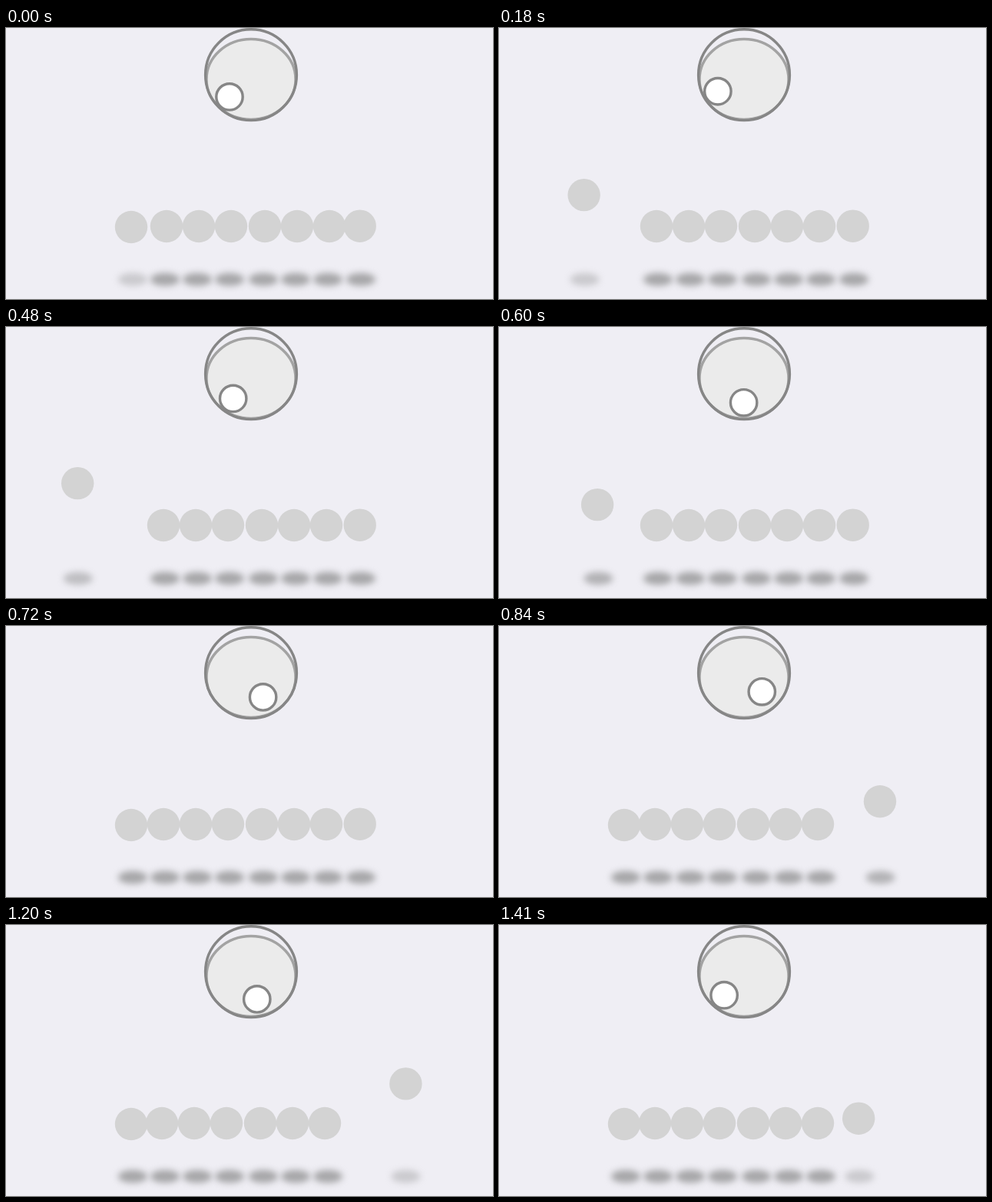
Write an HTML page that moves like this. It is 634 px wide and 354 px high and loops after 1440 ms.

```html
<!DOCTYPE html>
<html lang="en">
<head>
<meta charset="utf-8">
<title>Cradle</title>
<style>
  html, body { margin: 0; width: 100%; height: 100%; overflow: hidden; background: #efeef4; }
  svg { display: block; }
  #shadows ellipse { fill: #a6a6a8; filter: blur(4px); }
  #balls circle { fill: #d3d3d3; }
</style>
</head>
<body>
<svg width="634" height="354" viewBox="0 0 634 354">
  <ellipse cx="319" cy="67" rx="58" ry="52.5" fill="#ebebeb" stroke="#a3a3a3" stroke-width="3.4"/>
  <circle cx="319" cy="61.2" r="59.4" fill="none" stroke="#868686" stroke-width="3.4"/>
  <circle id="eye" r="17.2" fill="#fff" stroke="#868686" stroke-width="3.4"/>
  <g id="shadows"></g>
  <g id="balls"></g>
</svg>
<script>
const LOOP = 1440, STEP = 30;
const restX = [163, 205, 247, 289, 333, 375, 417, 460.7];
const shadowX = [165, 207, 249, 291, 335, 377, 419, 462];
const $ = id => document.getElementById(id);

function add(parent, tag, attrs) {
  const el = document.createElementNS('http://www.w3.org/2000/svg', tag);
  set(el, attrs);
  return parent.appendChild(el);
}
function set(el, attrs) {
  for (const key in attrs) el.setAttribute(key, attrs[key]);
}

const shadows = shadowX.map(cx => add($('shadows'), 'ellipse', { cx, cy: 328.5, rx: 19, ry: 8.5 }));
const balls = restX.map(cx => add($('balls'), 'circle', { cx, cy: 259, r: 21.2 }));

const clamp = x => Math.min(1, Math.max(0, x));
const ramp = (t, from, to) => clamp((t - from) / (to - from));
const swing = (t, start, peak, end) => Math.min(ramp(t, start, peak), 1 - ramp(t, peak, end));

// cubic-bezier(.25, .1, .25, 1)
function ease(x) {
  let lo = 0, hi = 1;
  for (let i = 0; i < 20; i++) {
    const s = (lo + hi) / 2;
    if (.75 * s * (1 - s) + s ** 3 < x) lo = s; else hi = s;
  }
  return .3 * lo * (1 - lo) ** 2 + 3 * lo * lo * (1 - lo) + lo ** 3;
}

// Degrees from straight down, positive towards the left
function eyeAngle(t) {
  if (t >= 338 && t < 1035) return 60 - 127 * ease((t - 338) / 860);
  const since = (t - 1035 + LOOP) % LOOP;
  return -64.5 + 124.5 * ease(clamp(since / 725));
}

function draw(t) {
  const angle = eyeAngle(t) * Math.PI / 180;
  set($('eye'), { cx: 314.7 - 35.5 * Math.sin(angle), cy: 63.5 + 35.5 * Math.cos(angle) });

  const left = 104.7 * swing(t, 0, 360, 720);
  const right = 97 * swing(t, 720, 1050, LOOP);
  set(balls[0], { cx: restX[0] - left, cy: 260 - .8 * left });
  set(balls[7], { cx: restX[7] + right, cy: 258.7 - .8 * right - .001 * right * right });

  const nudge = 4 * (1 - ramp(t, 0, 120)) - 2 * ramp(t, 720, 810);
  for (let i = 1; i < 7; i++) set(balls[i], { cx: restX[i] + nudge });

  set(shadows[0], { cx: shadowX[0] - left * 1.02, opacity: .5 + .5 * ramp(t, 360, 720) });
  set(shadows[7], { cx: shadowX[7] + right * .98, opacity: 1 - .5 * ramp(t, 720, 1050) });
}

const start = performance.now();
function tick() {
  const t = (performance.now() - start) % LOOP;
  draw(Math.floor(t / STEP) * STEP);
  requestAnimationFrame(tick);
}
tick();
</script>
</body>
</html>
```
